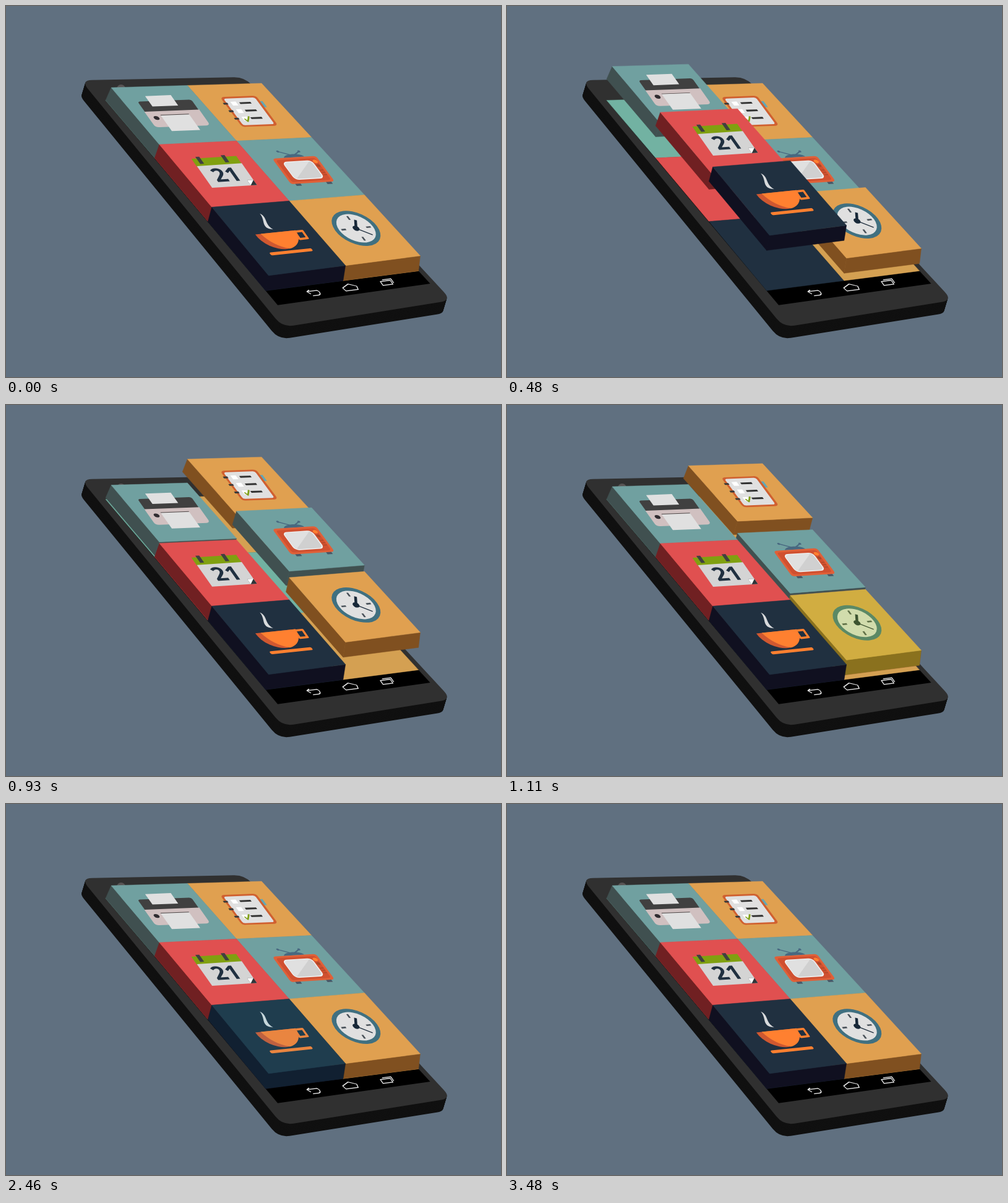
Animation, 800 px wide and 600 px high, one loop 4500 ms. Source, as an HTML page with a canvas:

```html
<!DOCTYPE html>
<html>
<head>
<meta charset="utf-8">
<style>
html, body { margin: 0; width: 100%; height: 100%; overflow: hidden; background: #607080; }
canvas { display: block; }
</style>
</head>
<body>
<canvas id="stage" width="800" height="600"></canvas>
<script>
const ctx = document.getElementById('stage').getContext('2d');
const LOOP = 4500, STEP = 30;
const COLUMN_DELAY = 390, GLOW_START = 2430, GLOW_GAP = 130;

const TEAL = { top: '#70a0a0', side: '#405050', floor: '#72b2a2' };
const AMBER = { top: '#e0a050', side: '#805020', floor: '#d4a052' };
const RED = { top: '#e05050', side: '#702022', floor: '#e05050' };
const NAVY = { top: '#203040', side: '#101020', floor: '#203040' };

// Back row first; each row has a left and a right tile
const rows = [
  { icons: [printer, notes], skins: [TEAL, AMBER], start: 200, peak: 635, high: [51, 51], fall: 2.1 },
  { icons: [calendar, tv], skins: [RED, TEAL], start: 130, peak: 510, high: [56, 56], fall: 3.1 },
  { icons: [coffee, clock], skins: [NAVY, AMBER], start: 0, peak: 480, high: [65, 54], fall: 3.4 }
];

// Grid position (u across, v down) to the screen: raised surface and floor
function surface(u, v) {
  const k = u * (0.514 - 0.007 * u);
  return [
    170 + 74.3 * v + 3.5 * v * v + k * (243 + 4.2 * v - 1.17 * v * v),
    132 + 87.3 * v + 4.67 * v * v - k * (7 + 2.55 * v + 1.92 * v * v)
  ];
}

function floor(u, v) {
  const [x, y] = surface(u, v);
  return [x - 9 + 1.4 * v + u, y + 20.5 + 1.3 * v];
}

function quad(map, u, v, w = 1, h = 1) {
  return [map(u, v), map(u + w, v), map(u + w, v + h), map(u, v + h)];
}

function poly(points, fill, edge) {
  ctx.beginPath();
  points.forEach(p => ctx.lineTo(...p));
  ctx.closePath();
  ctx.fillStyle = fill;
  ctx.fill();
  if (edge) {
    ctx.strokeStyle = fill;
    ctx.lineWidth = edge;
    ctx.stroke();
  }
}

function box(x, y, w, h, fill, r = 0) {
  ctx.beginPath();
  ctx.roundRect(x, y, w, h, r);
  ctx.fillStyle = fill;
  ctx.fill();
}

function dot(x, y, r, fill) {
  ctx.beginPath();
  ctx.arc(x, y, r, 0, 2 * Math.PI);
  ctx.fillStyle = fill;
  ctx.fill();
}

function shape(d, fill) {
  ctx.fillStyle = fill;
  ctx.fill(new Path2D(d));
}

function line(d, color, width) {
  ctx.strokeStyle = color;
  ctx.lineWidth = width;
  ctx.lineJoin = 'round';
  ctx.stroke(new Path2D(d));
}

// Icons are flat drawings on a tile of 100 by 100 with its centre at 0,0
function printer() {
  box(-34, -25, 70, 19, '#404040', [3, 3, 0, 0]);
  box(-34.5, -7, 71.5, 28, '#d0c0c0', [0, 0, 5, 5]);
  box(-19.5, -34, 33.5, 18.5, '#e0e0e0');
  box(-17, 0, 37, 28.3, '#e0e0e0');
  line('M-17 0H20', '#504848', 1);
  dot(-24.6, 4.7, 3.5, '#302c30');
}

function notes() {
  box(18, -18, 9.5, 11, '#60a8b8');
  box(-24, -28, 48.3, 54.5, '#d06030', 5);
  box(-21, -25, 42, 48.5, '#e0e0e0', 3);
  for (let y = -16; y < 20; y += 13.7) {
    box(-26, y - 1.5, 6, 3.2, '#383838');
    box(-15, y - 3, 7, 7, '#fff');
    box(-4, y - 1.5, 15, 3.2, '#303030');
  }
  line('M-13 12L-11 17L-5 8', '#80a018', 2);
}

function calendar() {
  box(-28, -26, 58, 13, '#80a010');
  box(-27.5, -14, 58, 35.3, '#d4d4d4');
  box(-21.5, -28.5, 5, 11.5, '#404040');
  box(11.2, -28.5, 5, 11.5, '#404040');
  box(22.5, 13, 8, 8.3, '#303438');
  shape('M22.5 13H30.5L22.5 21.3Z', '#fff');
  ctx.font = '700 30px "Open Sans", sans-serif';
  ctx.textAlign = 'center';
  ctx.fillStyle = '#203040';
  ctx.fillText('21', 1, 13);
}

function coffee() {
  shape('M-3 -36C4 -30 -7 -20 0 -12C-15 -15 -1 -26 -3 -36Z', '#d8dadc');
  line('M24 -5.5H34V5.5H24Z', '#ff8030', 3);
  shape('M-26 -7.4A26 25 0 0 0 26 -7.4Z', '#d05830');
  shape('M-19 -7.4Q-14 11 4 17.5A26 25 0 0 0 26 -7.4Z', '#ff8030');
  box(-24.5, 20, 54.5, 4.3, '#ff8030', 2);
}

function tv() {
  line('M-13 -30L2 -22M14 -28L4 -22', '#486880', 1.6);
  dot(-13, -30, 1.7, '#486880');
  dot(14, -28, 1.7, '#486880');
  shape('M-11 -19C-8 -26 14 -26 16 -19Z', '#486880');
  for (const x of [-21, 20]) box(x, 23, 7, 5, '#485868');
  box(-26.5, -19, 58, 43.5, '#e06038', 4);
  box(-23.5, -16, 52, 37.5, '#d05030', 3);
  box(-17.5, -12.5, 39.5, 30.7, '#f0f0f0', 6);
  box(-16, -11, 36.5, 27.7, '#d0d0d0', 5);
  shape('M-11 -11H18L-14 16Q-16 15 -16 11V-6Q-16 -11 -11 -11Z', '#e0e0e0');
  dot(25.5, -10, 3, '#ff8030');
  dot(25.5, -3, 2.3, '#a84828');
  for (let y = 4; y < 14; y += 4) box(23.5, y, 4.5, 1.2, '#a84828');
}

function clock() {
  ctx.translate(2.4, -1.2);
  dot(0, 0, 27.8, '#407080');
  dot(0, 0, 22.5, '#e0e0e0');
  for (let i = 0; i < 4; i++) {
    ctx.rotate(Math.PI / 2);
    box(13.5, -1.2, 6, 2.4, '#485058');
  }
  line('M0 0L6.8 -12.4', '#182838', 3.2);
  line('M0 0L14.7 12.2', '#182838', 1.4);
  dot(0, 0, 4, '#182838');
}

function softQuad(points, cut, dx, dy) {
  ctx.beginPath();
  points.forEach(([x, y], i) => {
    const toward = ([px, py]) => {
      const k = cut / Math.hypot(px - x, py - y);
      return [x + (px - x) * k + dx, y + (py - y) * k + dy];
    };
    ctx.lineTo(...toward(points[(i + 3) % 4]));
    ctx.quadraticCurveTo(x + dx, y + dy, ...toward(points[(i + 1) % 4]));
  });
  ctx.closePath();
  ctx.fill();
}

function phone() {
  const body = [[121, 120], [386, 115], [720, 476], [447, 519.5]];
  ctx.fillStyle = '#101010';
  for (let d = 20; d > 0; d--) softQuad(body, 18, -0.3 * d, d);
  ctx.fillStyle = '#303030';
  softQuad(body, 18, 0, 0);
  dot(186, 134, 7, '#585454');
  poly(quad(floor, 0, 0, 2, 3.2), '#000');
  const buttons = [
    'M-3 -5L-7 -3L-4 1M-7 -3H5C9 -3 9 4 4 4H-3',
    'M-9.5 -1L0 -5.5L9 -1L8 4H-8Z',
    'M-7.5 -2.5H5.5V3.5H-7.5ZM-4 -4.5H7.5V2'
  ];
  buttons.forEach((d, i) => {
    ctx.save();
    ctx.transform(1.22, -0.16, 0.72, 1.05, 497 + 59.5 * i, 464 - 8.5 * i);
    line(d, '#e8e8e8', 1.2);
    ctx.restore();
  });
}

function lift(t, row, col) {
  const delay = COLUMN_DELAY * col;
  const start = row.start + delay, peak = row.peak + delay, end = 1020 + delay;
  if (t <= start || t >= end) return 0;
  const k = t < peak
    ? Math.pow((t - start) / (peak - start), 0.9)
    : Math.pow((end - t) / (end - peak), row.fall);
  return row.high[col] * k;
}

function pulse(t, start, length) {
  const u = (t - start) / length;
  return u > 0 && u < 1 ? 0.26 * Math.pow(Math.sin(Math.PI * u), 0.7) : 0;
}

function drawTile(t, r, col) {
  const row = rows[r], skin = row.skins[col];
  const top = quad(surface, col, r), base = quad(floor, col, r);
  const [a, b, c, d] = top;
  // Mean of two opposite edges, per hundredth of a tile
  const across = i => (b[i] - a[i] + c[i] - d[i]) / 200;
  const down = i => (d[i] - a[i] + c[i] - b[i]) / 200;
  const middle = i => (a[i] + b[i] + c[i] + d[i]) / 4;

  ctx.save();
  ctx.translate(0, -lift(t, row, col));
  poly([a, d, base[3], base[0]], skin.side, 0.5);
  poly([d, c, base[2], base[3]], skin.side, 0.5);
  poly(top, skin.top, 0.5);

  ctx.save();
  ctx.transform(across(0), across(1), 0.82 * down(0), down(1), middle(0), middle(1));
  row.icons[col]();
  ctx.restore();

  const turn = 2 * (2 - r) + col;
  let glow = pulse(t, GLOW_START + GLOW_GAP * turn, 400);
  if (r === 2) glow += pulse(t, 660 + 330 * col, 240);
  if (glow) poly([a, b, c, base[2], base[3], base[0]], `hsla(${190 - 117 * turn}, 80%, 45%, ${glow})`);
  ctx.restore();
}

function draw(now) {
  const t = Math.floor(now % LOOP / STEP) * STEP;
  ctx.fillStyle = '#607080';
  ctx.fillRect(0, 0, 800, 600);
  phone();
  rows.forEach((row, r) => row.skins.forEach((skin, col) => poly(quad(floor, col, r), skin.floor, 0.5)));
  for (const col of [1, 0]) rows.forEach((row, r) => drawTile(t, r, col));
}

const begin = performance.now();
function tick() {
  draw(performance.now() - begin);
  requestAnimationFrame(tick);
}
tick();
</script>
</body>
</html>
```
